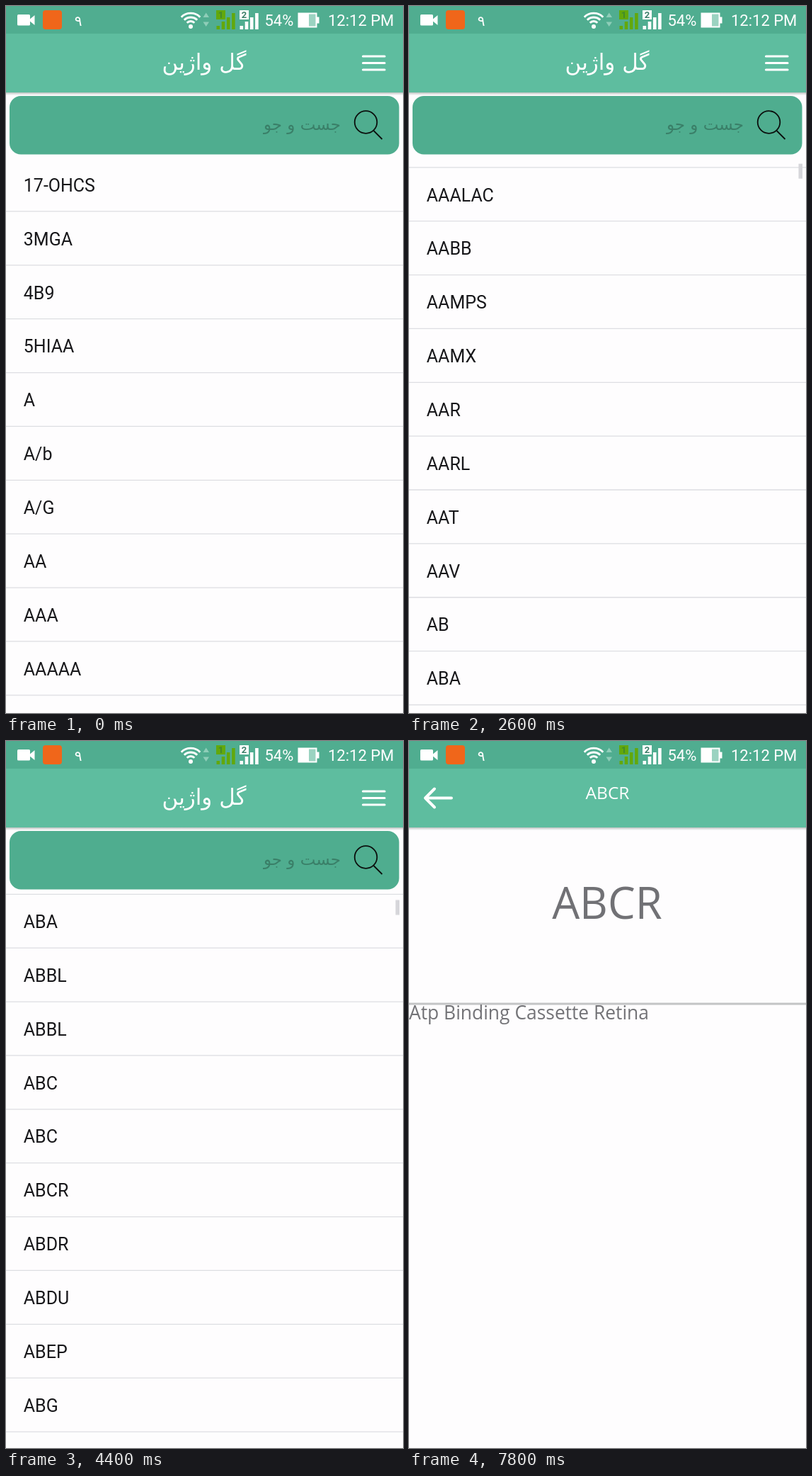
These frames come from a looping animation (561 px wide and 998 px high, 8 s). An HTML page:

```html
<!DOCTYPE html>
<html lang="fa">
<head>
<meta charset="utf-8">
<title>Dictionary list</title>
<style>
  @property --s { syntax: "<number>"; inherits: true; initial-value: 0; }

  html, body { margin: 0; width: 100%; height: 100%; overflow: hidden; background: #fefdfe; }
  #stage { display: block; width: 561px; height: 998px; animation: scroll 8s infinite; }

  text { font-family: Roboto, sans-serif; }
  .fa { font-family: "DejaVu Sans", sans-serif; direction: rtl; text-anchor: middle; }
  .word { font-family: "Open Sans", sans-serif; }
  .mid { text-anchor: middle; }

  #list { transform: translateY(calc(var(--s) * -1px)); font-size: 25px; fill: #17171a; }
  #list line { stroke: #dddee2; stroke-width: 1.3; }
  #thumb { transform: translateY(calc(var(--s) * .0026px)); animation: thumb 8s step-end infinite; }
  #press { animation: press 8s step-end infinite; }
  #detail { animation: open 8s step-end infinite; }

  /* scroll offset in px, held for 200 ms at a time */
  @keyframes scroll {
    0%   { --s: 0; animation-timing-function: step-end; }
    10%  { --s: 0; animation-timing-function: steps(6); }
    25%  { --s: 506.3; animation-timing-function: steps(6); }
    40%  { --s: 983.7; animation-timing-function: steps(6); }
    55%  { --s: 1439.3; animation-timing-function: steps(2); }
    60%  { --s: 1560; animation-timing-function: steps(2); }
    65%  { --s: 1603.7; animation-timing-function: steps(2); }
    70%  { --s: 1560; animation-timing-function: steps(2); }
    75%, 100% { --s: 1439.3; }
  }
  @keyframes thumb {
    0% { opacity: 0; }
    12.5% { opacity: 1; }
    80%, 100% { opacity: 0; }
  }
  @keyframes press {
    0% { opacity: 0; }
    82.5%, 100% { opacity: 1; }
  }
  @keyframes open {
    0% { opacity: 0; }
    85% { opacity: .5; }
    87.5%, 100% { opacity: 1; }
  }
</style>
</head>
<body>
<svg id="stage" viewBox="0 0 561 998" xmlns="http://www.w3.org/2000/svg">
  <defs>
    <linearGradient id="shade" x2="0" y2="1">
      <stop stop-color="#8d9a95" stop-opacity=".75"/>
      <stop offset="1" stop-color="#c8cccb" stop-opacity="0"/>
    </linearGradient>
    <clipPath id="view"><rect y="210" width="561" height="788"/></clipPath>
    <g id="bar">
      <rect y="121.5" width="561" height="5" fill="url(#shade)"/>
      <rect y="38" width="561" height="84" fill="#5ebd9f"/>
    </g>
  </defs>

  <rect width="561" height="998" fill="#fefdfe"/>

  <g clip-path="url(#view)">
    <g id="list"></g>
    <rect id="thumb" x="550.5" y="220.7" width="5.5" height="21" fill="#d6d6da"/>
  </g>

  <use href="#bar"/>
  <text class="fa" x="280" y="90" font-size="31" fill="#fff">گل واژین</text>
  <path d="M504.5 71H535M504.5 80.5H535M504.5 90H535" stroke="#fff" stroke-width="3.2" stroke-linecap="round"/>

  <rect x="5" y="127" width="550.5" height="82.5" rx="16" fill="#4fad8f"/>
  <text class="fa" x="418.5" y="175" font-size="23" fill="#3a7f68">جست و جو</text>
  <g fill="none" stroke="#0b0f0d" stroke-width="1.8">
    <circle cx="508.5" cy="164" r="15.8"/>
    <path d="M519.5 176L531.5 188"/>
  </g>

  <g id="detail">
    <rect y="38" width="561" height="960" fill="#fefdfe"/>
    <use href="#bar"/>
    <path d="M60 80.5H23M36 67.5L23 80.5L36 93.5" fill="none" stroke="#fff" stroke-width="4" stroke-linecap="round" stroke-linejoin="round"/>
    <text class="word mid" x="280.5" y="82" font-size="24.5" fill="#fff">ABCR</text>
    <text class="word mid" x="280" y="250.5" font-size="61.5" fill="#717175">ABCR</text>
    <rect y="369.5" width="561" height="3" fill="#c3c4c5"/>
    <text class="word" x="0" y="392.5" font-size="26.4" fill="#737377">Atp Binding Cassette Retina</text>
  </g>

  <!-- status bar -->
  <rect width="561" height="39" fill="#50ad90"/>
  <g fill="#fff">
    <rect x="16" y="12" width="18" height="15.5" rx="1.5"/>
    <path d="M32 20L40.5 13V27Z"/>
    <text class="fa" x="102" y="28" font-size="20">۹</text>
    <circle cx="261" cy="29" r="3"/>
    <path id="wifi" fill="none" stroke="#fff" stroke-width="2.8"/>
    <path d="M278.5 16L282.7 9.5L287 16ZM278.5 22.5L282.7 29L287 22.5Z" fill="#8ecdb8"/>
    <text x="365.5" y="28" font-size="22">54%</text>
    <text x="455" y="28" font-size="22">12:12 PM</text>
    <rect x="413.5" y="10.5" width="25" height="19" fill="#9bd3c1" stroke="#fff" stroke-width="2"/>
    <rect x="414" y="11" width="14" height="18"/>
    <rect x="439" y="15.5" width="3.5" height="9"/>
  </g>
  <rect x="52" y="6" width="27" height="27" rx="4" fill="#f0661a"/>
  <g id="signals"></g>
</svg>
<script>
  const words = ("17-OHCS 3MGA 4B9 5HIAA A A/b A/G AA AAA AAAAA AAALAC AABB AAMPS AAMX AAR AARL " +
    "AAT AAV AB ABA ABBL ABBL ABC ABC ABCR ABDR ABDU ABEP ABG ABG ABH ABIL").split(" ");
  const top0 = 214.1, pitch = 75.87;
  const byId = id => document.getElementById(id);

  byId("list").innerHTML = words.map((word, i) => {
    const y = top0 + pitch * i;
    const press = word === "ABCR"
      ? `<rect id="press" y="${y}" width="561" height="${pitch}" fill="#f6f7f9"/>` : "";
    return `${press}<text x="24.8" y="${y + 47.7}">${word}</text>
      <line x2="561" y1="${y + pitch}" y2="${y + pitch}"/>`;
  }).join("");

  // quarter arcs around the dot
  byId("wifi").setAttribute("d", [7.5, 13, 18.8].map(r => {
    const d = r * Math.SQRT1_2;
    return `M${261 - d} ${29 - d}A${r} ${r} 0 0 1 ${261 + d} ${29 - d}`;
  }).join(""));

  const signal = (x, n, color, ink) => {
    let bars = "";
    for (let i = 0; i < 4; i++) {
      const h = 5 + 6 * i;
      bars += `<rect x="${x + 7.2 * i}" y="${33 - h}" width="4.6" height="${h}"/>`;
    }
    return `<g fill="${color}">${bars}<rect x="${x - 0.5}" y="6" width="13" height="13"/>
      <text class="mid" x="${x + 6}" y="17" font-size="13" font-weight="700" fill="${ink}">${n}</text></g>`;
  };
  byId("signals").innerHTML = signal(297.5, 1, "#62a80c", "#3f8a2c") + signal(330.5, 2, "#fff", "#3c7f69");
</script>
</body>
</html>
```
